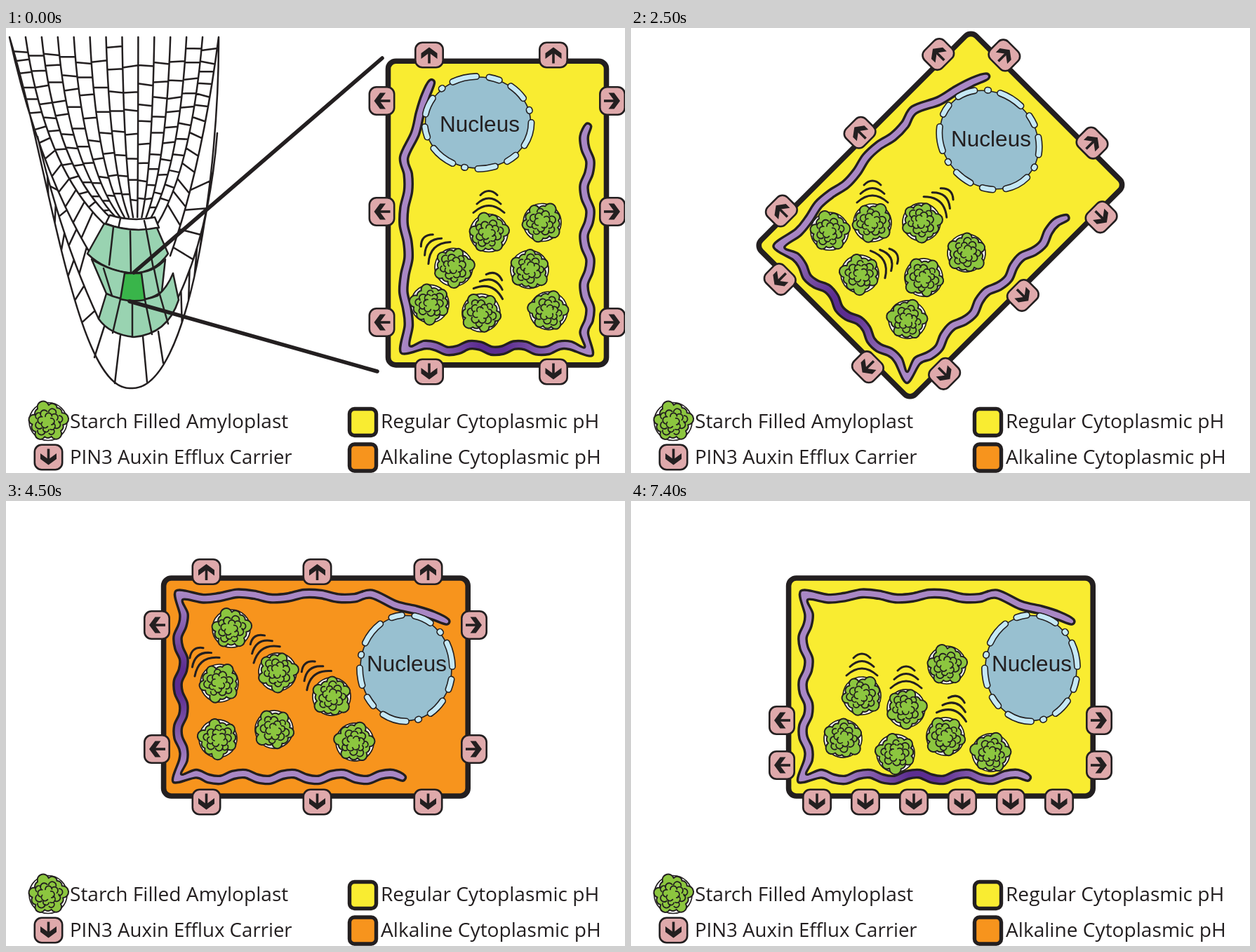
Write an HTML page that moves like this. It is 882 px wide and 635 px high and loops after 8 s.

```html
<!DOCTYPE html>
<html lang="en">
<head>
<meta charset="utf-8">
<title>Amyloplasts and auxin carriers</title>
<style>
  html, body { margin: 0; width: 100%; height: 100%; overflow: hidden; background: #fff; }
  svg { display: block; width: 100%; height: 100%; }
  .ink { stroke: #231f20; stroke-linecap: round; stroke-linejoin: round; }
  .line { fill: none; }
  text { fill: #231f20; font: 28.1px "Open Sans", "Noto Sans", sans-serif; }
  .nucleus { font: 31.5px "Liberation Sans", Arial, sans-serif; text-anchor: middle; }
</style>
</head>
<body>
<svg id="stage" viewBox="0 0 882 635"></svg>
<script>
const YELLOW = '#f9ec31', ORANGE = '#f7941d', MINT = '#99d3b1', TAU = 2 * Math.PI;
const CENTER = [444, 264.5];
const fmt = n => n.toFixed(1);
const polar = (r, a) => `${fmt(r * Math.cos(a))} ${fmt(r * Math.sin(a))}`;
const range = n => [...Array(n).keys()];
const random = n => { const v = Math.sin(n * 12.9898 + 4) * 43758.5453; return v - Math.floor(v); };
const spread = (count, gap, middle = 0) => range(count).map(i => middle + (i - (count - 1) / 2) * gap);

// Point of a Bezier curve of any degree
function bezier(points, t) {
  if (points.length === 1) return points[0];
  return bezier(points.slice(1).map(([x, y], i) =>
    [points[i][0] * (1 - t) + x * t, points[i][1] * (1 - t) + y * t]), t);
}
const bezierPath = ([first, ...rest]) => `M${first}${rest.length === 3 ? 'C' : 'Q'}${rest.join(' ')}`;

// Closed Catmull-Rom curve through the points
function closedCurve(points) {
  const n = points.length;
  return `M${points[0]}` + points.map((b, i) => {
    const [a, c, e] = [i + n - 1, i + 1, i + 2].map(k => points[k % n]);
    return 'C' + [0, 1].map(k => fmt(b[k] + (c[k] - a[k]) / 6)) + ' ' +
      [0, 1].map(k => fmt(c[k] - (e[k] - b[k]) / 6)) + ' ' + c.map(fmt);
  }).join('') + 'Z';
}

// Wavy band along three sides of the cell; optional third value is the half width
const wave = (v, crest, period) => Math.cos(TAU * (v - crest) / period);
const strand = [
  [351, 77, 4], [342, 97], [334, 122], [327, 151],
  ...range(11).map(i => 185 + 24 * i).map(y => [314 + 4 * wave(y, 222, 99), y]),
  [313, 459, 8],
  ...range(14).map(i => 340 + 16 * i).map(x => [x, 457 - 5 * wave(x, 345, 65)]),
  [574, 462, 8],
  ...range(17).map(i => 435 - 17.5 * i).map(y => [572 + 5 * wave(y, 196, 70), y]),
  [574, 139, 4]
];
function ribbon(points) {
  const side = sign => points.map(([x, y, w = 5.7], i) => {
    const a = points[Math.max(0, i - 1)], b = points[Math.min(points.length - 1, i + 1)];
    const dx = b[0] - a[0], dy = b[1] - a[1], k = sign * w / Math.hypot(dx, dy);
    return [x - dy * k, y + dx * k];
  });
  return closedCurve([...side(1), ...side(-1).reverse()]);
}
const strandPath = ribbon(strand);

// Irregular lobed blob with scattered curls
function plastidShape() {
  const lobes = 11;
  const rim = range(lobes).map(i => polar(20.5 + 3 * random(i), (i + .4 * random(i + 20)) * TAU / lobes));
  const edge = `M${rim[lobes - 1]}` + rim.map(p => `A6.8 6.8 0 0 1 ${p}`).join('');
  const curls = range(15).map(i => {
    const a = i * 2.4, r = 4.3 * Math.sqrt(i + 1), size = 4 + 1.5 * random(i);
    const spin = a * 180 / Math.PI + 60 * (random(i + 40) - .5);
    return `<path transform="translate(${polar(r, a)}) rotate(${fmt(spin)})" d="M0 ${-size}A${size} ${size} 0 0 1 0 ${size}"/>`;
  }).join('');
  return `<circle r="27" fill="#fff" stroke-width="1.7"/>
    <path d="${edge}Z" fill="#8cc63f" stroke-width="2"/>
    <g class="line" stroke-width="1.8">${curls}</g>`;
}

const motionMarks = range(3).map(i => {
  const w = 12 + 5 * i, end = -54 + 12.5 * i;
  return `M${-w} ${end}Q0 ${-66 + 8.5 * i} ${w} ${end}`;
}).join('');

const defs = `<defs>
  <g id="plastid" class="ink">${plastidShape()}</g>
  <g id="pin" class="ink">
    <rect x="-19.7" y="-17.7" width="39.4" height="35.4" rx="10" fill="#dfa9ab" stroke-width="2.6"/>
    <path d="M0-11L11.5-2.5V5.5L0-3L-11.5 5.5V-2.5Z" fill="#231f20" stroke="none"/>
    <path d="M0 12V-5" stroke-width="3.6" stroke-linecap="butt"/>
  </g>
  <path id="marks" class="ink line" stroke-width="3" d="${motionMarks}"/>
  ${[['low', 435, 462], ['right', 572, 290]].map(([id, x, y]) =>
    `<radialGradient id="${id}" gradientUnits="userSpaceOnUse" cx="${x}" cy="${y}" r="125">
      <stop offset=".15" stop-color="#5c2d91"/><stop offset="1" stop-color="#a987c5"/>
    </radialGradient>`).join('')}
</defs>`;

const use = (id, x, y, turn = 0) => `<use href="#${id}" transform="translate(${x} ${y}) rotate(${turn})"/>`;

// Offsets along each side, measured from the middle of the cell
function pinsOf({ top, bottom, left, right }) {
  const [cx, cy] = CENTER;
  return [
    ...top.map(x => use('pin', cx + x, cy - 225.5)),
    ...bottom.map(x => use('pin', cx + x, cy + 226.5, 180)),
    ...left.map(y => use('pin', cx - 164.5, cy + y, -90)),
    ...right.map(y => use('pin', cx + 164, cy + y, 90))
  ].join('');
}

function cell({ at, turn = 0, fill = YELLOW, shade = 'low', pins, nucleus, label, plastids }) {
  const [cx, cy] = CENTER;
  const pieces = (color, width) => `<ellipse rx="76" ry="66" pathLength="360" stroke="${color}" stroke-width="${width}"
    stroke-dasharray="28 15 12 15 20 15 1 14" stroke-dashoffset="0"/>`;
  return `<g transform="translate(${at}) rotate(${turn}) translate(${-cx} ${-cy})" class="ink">
      <rect x="288.5" y="47.8" width="311" height="433.6" rx="11" fill="${fill}" stroke-width="7.6"/>
      ${pinsOf(pins)}
      <path d="${strandPath}" fill="url(#${shade})" stroke-width="3.4"/>
    </g>
    <g transform="translate(${nucleus}) rotate(${turn})" class="line" stroke-linecap="round">
      <ellipse rx="75" ry="65" fill="#98c0d0" class="ink" stroke-width="1.6"/>
      ${pieces('#231f20', 10)}${pieces('#c5e8f5', 6.8)}
    </g>
    <text class="nucleus" x="${label[0]}" y="${label[1]}">Nucleus</text>` +
    plastids.map(([x, y, swing], i) => use('plastid', x, y, i * 50) +
      (swing === undefined ? '' : use('marks', x, y, swing))).join('');
}

// Borders of the cell files, fanning out from the tip to both sides
const files = spread(14, 2 / 13).map(s => {
  const top = 154 + 149 * s, end = 178 + 40 * s + 16 * s ** 9;
  return [[top, 13], [top + (end - top) * (.18 + .17 * s ** 6), 200], [end, 270 + 55 * s ** 10]];
});
function root() {
  const wall = (a, t, b, u) => `M${bezier(a, t).map(fmt)}L${bezier(b, u).map(fmt)}`;
  let walls = '';
  files.slice(1).forEach((file, i) => {
    const step = .1 - .007 * Math.abs(i - 6);
    for (let t = .03 + step * random(i); t < .93; t += step * (.6 + .9 * t + .5 * random(t * 99 + i)))
      walls += wall(files[i], t, file, t + .02 * (random(t + i) - .5));
  });
  const flanks = [
    { skin: [[5, 13], [62, 200], [100, 520], [178, 514]], cap: [[45, 155], [78, 300], [132, 415]], file: files[0] },
    { skin: [[303, 13], [304, 200], [262, 520], [178, 514]], cap: [[301, 150], [290, 290], [245, 385]], file: files[13] }
  ];
  for (const { skin, cap, file } of flanks) {
    walls += bezierPath(skin) + bezierPath(cap);
    for (let t = .2; t < 1; t += .15) walls += wall(skin, .27 + .4 * t, cap, t);
    for (let t = .25; t < .8; t += .16) walls += wall(cap, t, file, .5 + .62 * t);
  }
  return `<g class="ink" stroke-width="2.5" fill="none">
    <path d="${files.map(bezierPath).join('')}${walls}"/>
    <path d="M148 267Q180 277 212 270L218 285Q180 294 142 279Z M163 272L160 286M197 275L200 288" fill="#fff"/>
    <g fill="${MINT}">
      <path d="M140 279Q180 293 215 285L231 322Q212 349 181 350Q141 347 116 322Z"/>
      <path d="M122 330Q150 348 181 350Q212 349 227 330L222 376Q205 389 180 389Q153 386 143 379Z"/>
      <path d="M143 379Q180 396 216 382Q230 370 238 350L246 388Q230 437 182 441Q147 437 132 415Z"/>
    </g>
    <path d="M169 350H193L198 388Q180 391 163 387Z" fill="#39b54a"/>
    <path d="M153 284L147 338M177 290L178 350M200 289L210 343M139 343L151 382M211 344L218 378
      M163 387L152 435M180 390V441M198 388L208 437M219 380L231 422
      M140 426L126 470M163 439L155 507M195 440L201 505M217 433L224 478"/>
    <path d="M182 349L536 43M176 390L529 490" stroke-width="5.6"/>
  </g>`;
}

const swatch = (y, fill) =>
  `<rect class="ink" x="489.5" y="${y}" width="38" height="38" rx="7" fill="${fill}" stroke-width="5.4"/>`;
const legend = use('plastid', 60, 561.5) + use('pin', 60.5, 612.5, 180) + swatch(543.5, YELLOW) + swatch(594, ORANGE) +
  `<text x="91" y="571">Starch Filled Amyloplast</text>
   <text x="91" y="622" style="font-size:27.6px">PIN3 Auxin Efflux Carrier</text>
   <text x="534" y="571">Regular Cytoplasmic pH</text>
   <text x="534" y="622">Alkaline Cytoplasmic pH</text>`;

// Plastids: x, y and, while sinking, the direction they come from
const sides = spread(3, 158, -2);
const upright = {
  at: CENTER, nucleus: [416.5, 135.5], label: [419, 148],
  pins: { top: spread(2, 177, -8.5), bottom: spread(2, 177, -8.5), left: sides, right: sides },
  plastids: [[432, 293, 0], [508, 278], [382, 342, -45], [490, 345], [348, 394], [421, 407, 20], [517, 404]]
};
const shifted = ([x, y, ...rest]) => [x + 256, y - .5, ...rest];
const magnified = {
  ...upright, at: shifted(CENTER), nucleus: shifted(upright.nucleus), label: shifted(upright.label),
  plastids: upright.plastids.map(shifted)
};
const tilted = {
  ...upright, at: [441, 267], turn: 45, nucleus: [510.5, 159.5], label: [513, 169],
  plastids: [[283, 290], [344, 278, 0], [414, 277, 42], [478, 321], [326, 351, 62], [417, 356], [394, 416]]
};
const lying = {
  at: [441.5, 265.5], turn: 90, nucleus: [570, 238.5], label: [571, 243],
  pins: { top: spread(2, 177), bottom: spread(2, 177), left: sides, right: sides },
  plastids: [[321, 182], [304, 260, -37], [387, 244, -32], [464, 279, -38], [302, 339], [382, 326], [497, 344]]
};
const settled = {
  ...lying, shade: 'right',
  plastids: [[450, 234], [329, 278, 0], [392, 296, 0], [302, 339], [377, 360], [448, 336, 17], [513, 359]]
};
const movingPins = { top: spread(2, 177), bottom: [...spread(2, 177), -8.5], left: [-160], right: [...sides, -77.5] };
const loweredPins = { top: spread(2, 64, 79.5), bottom: spread(2, 64, 79.5), left: [], right: spread(6, 69, 4) };

// Start time in ms and picture
const scenes = [
  [0, root() + cell(magnified)],
  [500, cell(upright)],
  [2500, cell(tilted)],
  [3500, cell(lying)],
  [4500, cell({ ...lying, fill: ORANGE })],
  [5500, cell({ ...settled, pins: movingPins })],
  [6500, cell({ ...settled, pins: loweredPins })]
];

const stage = document.getElementById('stage');
stage.innerHTML = defs + legend + scenes.map(([, art]) => `<g class="scene" display="none">${art}</g>`).join('');
const layers = [...stage.querySelectorAll('.scene')];
const start = performance.now();
let shown = -1;
function draw() {
  const time = (performance.now() - start) % 8000;
  const current = scenes.filter(([from]) => from <= time).length - 1;
  if (current !== shown) {
    layers.forEach((layer, i) => layer.setAttribute('display', i === current ? 'inline' : 'none'));
    shown = current;
  }
  requestAnimationFrame(draw);
}
draw();
</script>
</body>
</html>
```
